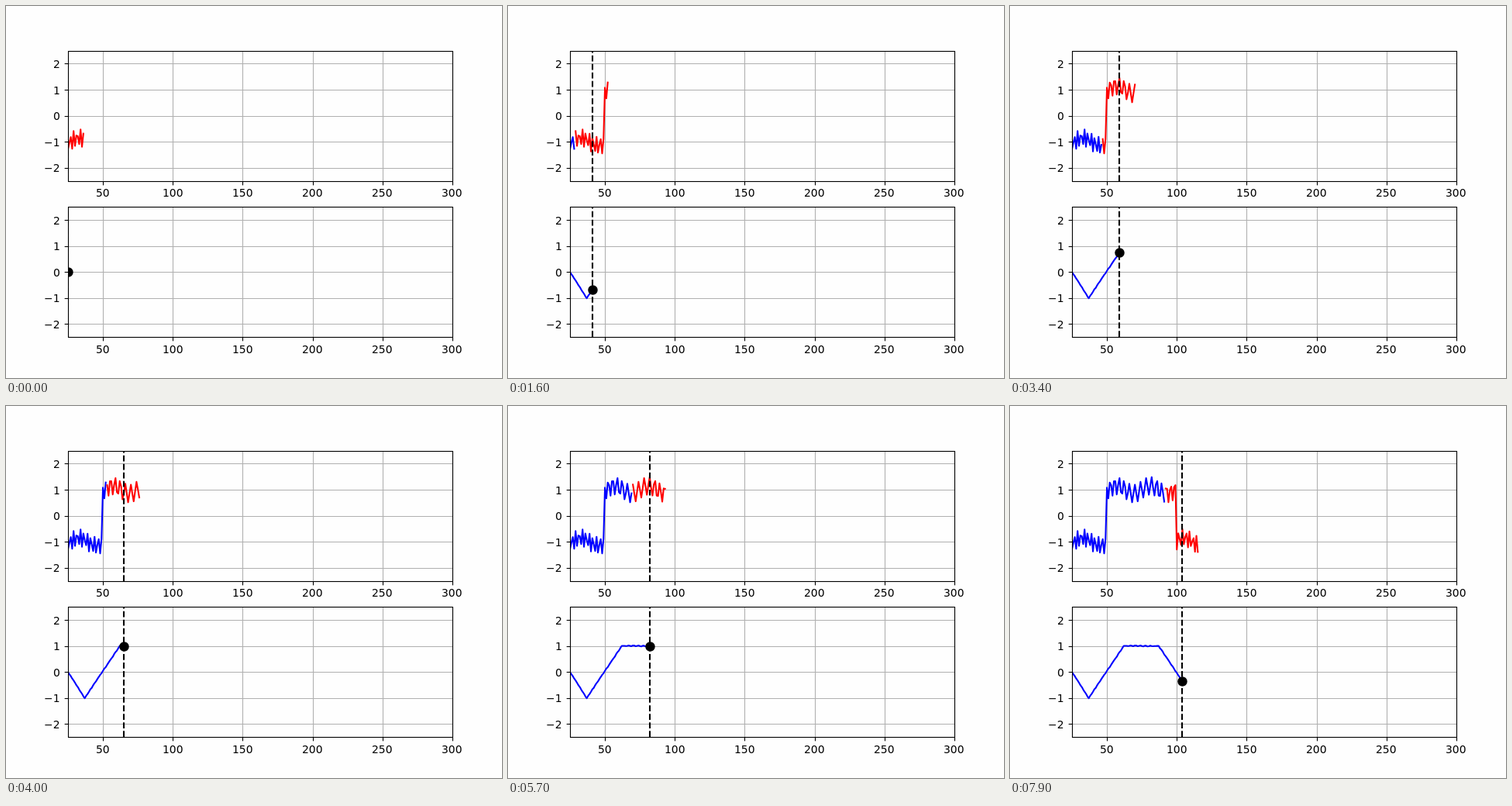
An HTML page with a canvas that plays this animation: 640x480 px, repeating every 8 s.

```html
<!DOCTYPE html>
<html lang="en">
<head>
<meta charset="utf-8">
<title>Moving average</title>
<style>
html, body { margin: 0; width: 100%; height: 100%; overflow: hidden; background: #fefefe; }
canvas { display: block; }
</style>
</head>
<body>
<canvas id="stage" width="640" height="480"></canvas>
<script>
const ctx = document.getElementById('stage').getContext('2d');

const LEFT = 80, RIGHT = 576, HEIGHT = 168;
const FIRST = 25, HALF = 12;
const STEP = 100, STEPS = 80;
const TOP_PLOT = 57.6, LOW_PLOT = 259.2;
const TURN = 2 * Math.PI;

// jitter: a fast wave whose pace drifts, on top of a slow one
function jitter(k) {
  const u = (k - 29) / 85;
  const cycles = 28 * u + 1.1 * Math.sin(TURN * u) - 0.2 * Math.cos(TURN * u) + 0.18;
  return 0.34 * Math.cos(TURN * cycles) + 0.15 * Math.cos(TURN * (k - 57) / 24);
}

// square wave of period 50 with jitter
const signal = k => (Math.floor(k / 25) % 2 ? -1 : 1) + jitter(k);
const level = k => Math.floor(k / 25) % 2 ? signal(k) : k < FIRST ? 1 : signal(k);

function average(k) {
  let sum = 0;
  for (let i = k - HALF; i <= k + HALF; i++) sum += wave(i);
  return sum / (2 * HALF + 1);
}

// high between 50 and 100, low on either side, high again before the plot
function wave(k) {
  if (k < FIRST) return 1;
  return (k >= 50 && k < 100 ? 1 : -1) + jitter(k);
}

const px = x => LEFT + (x - 25) * (RIGHT - LEFT) / 275;
const py = (top, v) => top + HEIGHT / 2 - v * HEIGHT / 5;
const crisp = v => Math.round(v) + 0.5;

function segment(x1, y1, x2, y2) {
  ctx.beginPath();
  ctx.moveTo(x1, y1);
  ctx.lineTo(x2, y2);
  ctx.stroke();
}

function clipTo(top) {
  ctx.save();
  ctx.beginPath();
  ctx.rect(LEFT, Math.round(top), RIGHT - LEFT, HEIGHT);
  ctx.clip();
}

function grid(top) {
  ctx.strokeStyle = '#b0b0b0';
  ctx.lineWidth = 1.11;
  for (let x = 50; x < 300; x += 50) {
    segment(crisp(px(x)), top, crisp(px(x)), top + HEIGHT);
  }
  for (let v = -2; v <= 2; v++) {
    const y = crisp(py(top, v));
    segment(LEFT, y, RIGHT, y);
  }
}

// align: 0.5 centres the text on x, 1 ends it there
function label(text, x, y, align) {
  const left = x - align * ctx.measureText(text).width;
  ctx.fillText(text, Math.floor(left), Math.round(y));
}

function frame(top) {
  const t = crisp(top), b = crisp(top + HEIGHT);
  ctx.strokeStyle = ctx.fillStyle = '#000';
  ctx.lineWidth = 1.11;
  ctx.strokeRect(LEFT + 0.5, t, RIGHT - LEFT, b - t);
  ctx.font = '13.89px "DejaVu Sans", sans-serif';
  for (let x = 50; x <= 300; x += 50) {
    const at = crisp(px(x));
    segment(at, b, at, b + 4.86);
    label(String(x), px(x), top + HEIGHT + 20.4, 0.5);
  }
  for (let v = -2; v <= 2; v++) {
    const y = crisp(py(top, v));
    segment(LEFT + 0.5, y, LEFT - 4.36, y);
    label((v < 0 ? '\u2212' : '') + Math.abs(v), 70.3, py(top, v) + 5.55, 1);
  }
}

function curve(top, fn, from, to, color) {
  if (to < from) return;
  ctx.strokeStyle = color;
  ctx.lineWidth = 2.08;
  ctx.lineJoin = 'round';
  ctx.lineCap = 'square';
  ctx.beginPath();
  for (let k = from; k <= to; k++) ctx.lineTo(px(k), py(top, fn(k)));
  ctx.stroke();
  ctx.lineCap = 'butt';
}

function cursor(top, k) {
  const x = Math.round(px(k)), y = Math.round(top);
  ctx.strokeStyle = '#000';
  ctx.lineWidth = 2.08;
  ctx.setLineDash([7.71, 3.33]);
  segment(x, y + HEIGHT, x, y);
  ctx.setLineDash([]);
}

function marker(top, k) {
  ctx.fillStyle = '#000';
  ctx.beginPath();
  ctx.arc(crisp(px(k)), crisp(py(top, average(k))), 6.25, 0, TURN);
  ctx.fill();
}

function draw(step) {
  const now = FIRST + step;
  const start = Math.max(FIRST, now - HALF);
  ctx.fillStyle = '#fefefe';
  ctx.fillRect(0, 0, 640, 480);

  clipTo(TOP_PLOT);
  grid(TOP_PLOT);
  curve(TOP_PLOT, wave, FIRST, start - 1, '#00f');
  curve(TOP_PLOT, wave, start, now + HALF - 1, '#f00');
  cursor(TOP_PLOT, now);
  ctx.restore();
  frame(TOP_PLOT);

  clipTo(LOW_PLOT);
  grid(LOW_PLOT);
  curve(LOW_PLOT, average, FIRST, now, '#00f');
  cursor(LOW_PLOT, now);
  marker(LOW_PLOT, now);
  ctx.restore();
  frame(LOW_PLOT);
}

const begin = performance.now();
function tick() {
  draw(Math.floor((performance.now() - begin) / STEP) % STEPS);
  requestAnimationFrame(tick);
}
tick();
</script>
</body>
</html>
```
